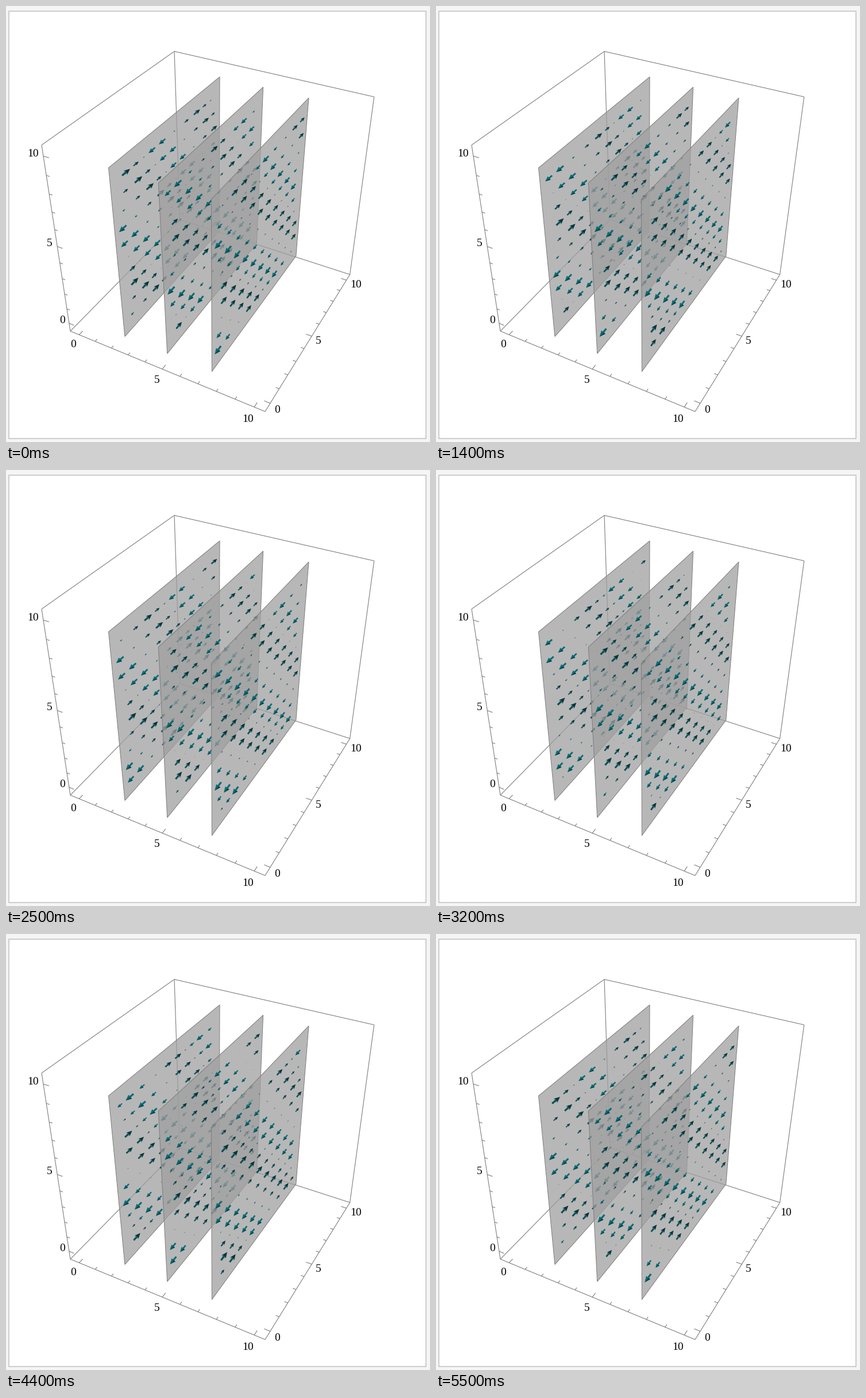
Animation of 738x759 px, one loop 6 s. Source, as a matplotlib script:

```python
import numpy as np
import matplotlib.pyplot as plt
from matplotlib.animation import FuncAnimation
from matplotlib.collections import LineCollection, PolyCollection
from matplotlib.patches import Polygon, Rectangle

W, H, DPI = 738, 759, 100
PX = 72 / DPI  # points per pixel

# Perspective camera over the unit box: origin, three axes, depth weights.
ORIGIN = np.array([112.0, 566.0])
AXES = np.array([[291.06, 64.95], [250.93, -120.23], [-60.29, -364.17]])
DEPTH = np.array([-0.1063, 0.1989, -0.166])

PLANES = (2.5, 5.0, 7.5)
GRID = np.arange(1, 11) * 10 / 11
REACH = 0.63  # length of the longest arrow in data units
STEP, LAG, LAST = 0.4, 0.36, 25

TEAL, TEAL_SHADE = "#0b6b75", "#07464e"
AWAY_HEAD, AWAY_BASE, AWAY_SHAFT = "#06343a", "#7b9c9e", "#0a4f57"


def project(unit):
    unit = np.asarray(unit, float)
    return (ORIGIN + unit @ AXES) / (1 + unit @ DEPTH)[..., None]


def data_to_px(x, y, z):
    x, y, z = np.broadcast_arrays(x, y, z)
    return project(np.stack([0.05 + 0.0895 * x, 0.05 + 0.09 * y,
                             0.05 + 0.09 * z], axis=-1))


fig = plt.figure(figsize=(W / DPI, H / DPI), dpi=DPI, facecolor="#f5f5f5")
ax = fig.add_axes([0, 0, 1, 1])
ax.set_xlim(0, W)
ax.set_ylim(H, 0)
ax.axis("off")
ax.add_patch(Rectangle((4.5, 8.5), 726, 744, fc="white", ec="#c3c3c3",
                       lw=1.6 * PX, zorder=0))


def draw_box():
    corners = [(0, 0, 0), (1, 0, 0), (1, 1, 0), (0, 1, 0),
               (0, 0, 1), (0, 1, 1), (1, 1, 1)]
    pts = project(corners)
    edges = [(0, 1), (1, 2), (2, 3), (3, 0), (0, 4), (4, 5), (5, 6), (6, 2),
             (5, 3)]
    lines = [pts[list(e)] for e in edges]
    for i in range(11):
        f = 0.05 + 0.09 * i
        size = 0.028 if i % 5 == 0 else 0.016
        lines.append(project([(f, 0, 0), (f, size, 0)]))
        lines.append(project([(1, f, 0), (1 - size, f, 0)]))
        lines.append(project([(0, 0, f), (size, 0, f)]))
    ax.add_collection(LineCollection(lines, colors="#7c7c7c",
                                     linewidths=1.1 * PX, zorder=1))


def draw_labels():
    spots = {"0": [(117, 588), (472, 701), (98, 545)],
             "5": [(263, 650), (544, 582), (76, 412)],
             "10": [(421, 717), (609, 484), (47, 256)]}
    for text, places in spots.items():
        for x, y in places:
            ax.text(x, y, text, ha="center", va="center_baseline",
                    family="Liberation Serif", size=19.5 * PX, color="black")


def draw_plane(x, z):
    quad = data_to_px(x, np.array([0, 10, 10, 0]), np.array([0, 0, 10, 10]))
    ax.add_patch(Polygon(quad, fc="#9f9f9f", ec="none", alpha=0.75, zorder=z))
    ax.add_patch(Polygon(quad, fc="none", ec="#7d7d7d", lw=1.0 * PX,
                         zorder=z))


def shape(tail, d, points):
    normal = np.array([-d[1], d[0]])
    return [tail + a * d + b * normal for a, b in points]


SHAFT = [(0, -0.09), (0.5, -0.09), (0.5, 0.09), (0, 0.09)]
HEAD = [(0.43, -0.25), (1, 0), (0.43, 0.25)]
SHADE = [(0.43, -0.25), (1, 0), (0.43, -0.04)]
ANGLES = np.linspace(0, 2 * np.pi, 13)[:-1]
BASE = [(0.43 + 0.08 * np.cos(a), 0.25 * np.sin(a)) for a in ANGLES]
TOWARD = [(SHAFT, TEAL), (HEAD, TEAL), (SHADE, TEAL_SHADE)]
AWAY = [(HEAD, AWAY_HEAD), (BASE, AWAY_BASE), (SHAFT, AWAY_SHAFT)]


def arrows(x, t):
    """Polygons and colours of the wave cos(x + y + z - t) on one plane."""
    y, z = (g.ravel() for g in np.meshgrid(GRID, GRID))
    value = np.cos(x + y + z - t)
    value = np.where(value < 0, -1, 1) * np.maximum(np.abs(value), 0.08)
    tails = data_to_px(x, y, z)
    spans = data_to_px(x, y + REACH * value, z) - tails
    polys, colors = [], []
    for tail, d, v in zip(tails, spans, value):
        for points, color in AWAY if v > 0 else TOWARD:
            polys.append(shape(tail, d, points))
            colors.append(color)
    return polys, colors


draw_box()
draw_labels()
layers = []
for k, px in enumerate(PLANES):
    draw_plane(px, 2 + 2 * k)
    layer = PolyCollection([], edgecolors="none", zorder=3 + 2 * k)
    ax.add_collection(layer)
    layers.append(layer)


def update(frame):
    # Rest, run forward, then run back to the start.
    n = max(0, min(frame - 4, 55 - frame, LAST))
    t = max(0.0, STEP * n - LAG)
    for x, layer in zip(PLANES, layers):
        polys, colors = arrows(x, t)
        layer.set_verts(polys)
        layer.set_facecolor(colors)
    return layers


anim = FuncAnimation(fig, update, frames=60, interval=100, repeat=True,
                     repeat_delay=0, blit=False)
plt.show()
```
